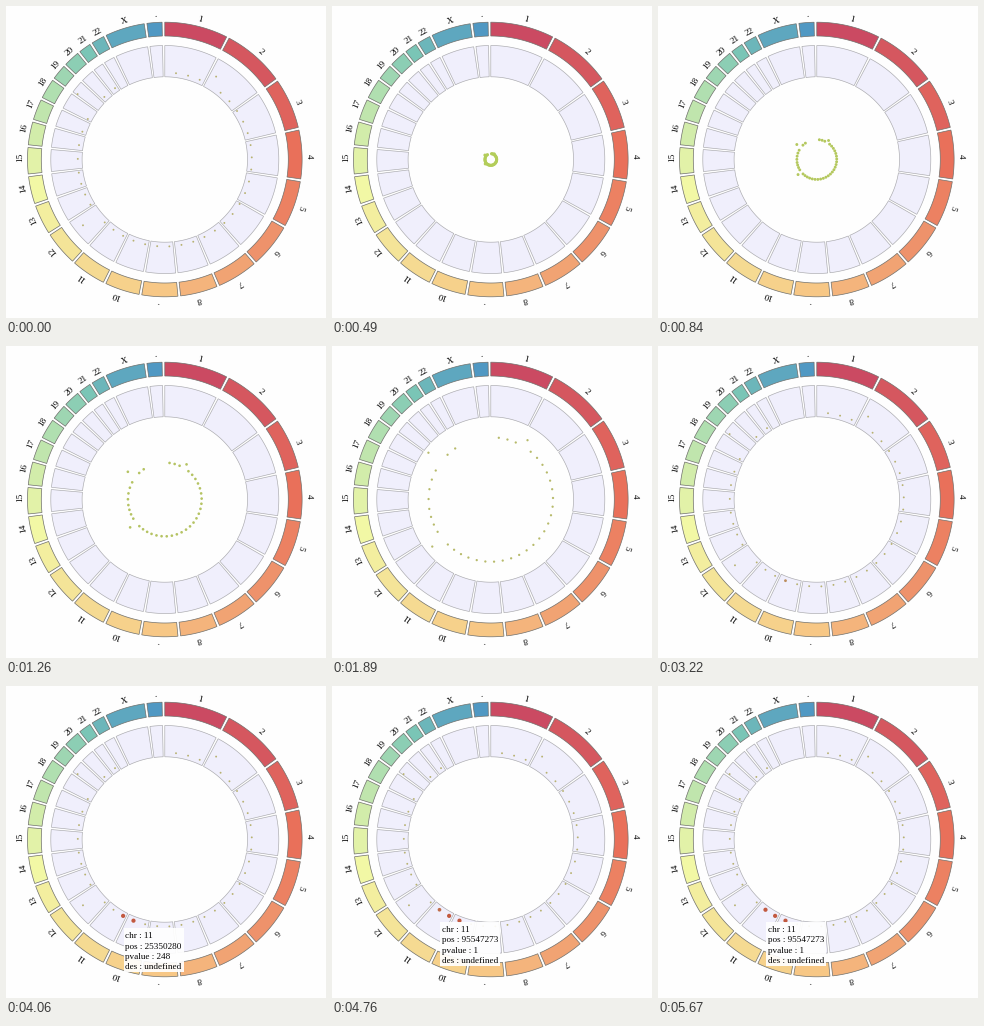
A matplotlib script that plays this animation: 320 px wide and 312 px high, repeating every 5810 ms.

```python
import numpy as np
import matplotlib.pyplot as plt
from matplotlib.animation import FuncAnimation
from matplotlib.colors import LinearSegmentedColormap, to_rgb
from matplotlib.patches import Polygon, Rectangle

W, H, DPI = 320, 312, 100
STEP, FRAMES = 70, 83
LOOP = STEP * FRAMES
CX, CY = 158.8, 153.5
PT = 72 / DPI  # points per pixel
GAP = 0.02
SERIF = "Liberation Serif"

# human chromosome lengths in Mb, 1 to 22, X, Y
LENGTHS = [249, 243, 198, 191, 181, 171, 159, 146, 141, 136, 135, 134,
           115, 107, 103, 90, 81, 78, 59, 63, 48, 51, 155, 59]
NAMES = [str(n) for n in range(1, 23)] + ["X", "."]
NAMES[8] = "."
SPECTRUM = LinearSegmentedColormap.from_list("spectrum", [
    (0, "#cb4a62"), (0.13, "#e9705a"), (0.35, "#f7c785"), (0.565, "#f2f8a5"),
    (0.74, "#b0dfb0"), (0.87, "#7ac5b6"), (1, "#5098c3")])

# points sit almost evenly around the ring, three of them further out
COUNT = 40
ANGLES = np.radians(np.interp(np.arange(COUNT), [0, 10, 24, 32, 39],
                              [7.4, 88.6, 201.1, 261.3, 325.1]))
RADII = np.full(COUNT, 87.0)
RADII[[3, 28, 37]] = 97.5, 105, 109

FLY_START, FLY_TIME = 345, 2160
DOT_NEAR, DOT_FAR, RED = (np.array(to_rgb(c)) for c in
                          ("#b3cf58", "#b8b272", "#c2593f"))

# point, start and length of its reddening, tooltip values
HOVERS = [(24, 3150, 280, ("10", "95442531", "36")),
          (25, 3780, 280, ("11", "25350280", "248")),
          (26, 4340, 560, ("11", "95547273", "1"))]
TIP_DELAY = 140


def polar(angle, radius):
    return CX + radius * np.sin(angle), CY - radius * np.cos(angle)


def sector(ax, start, end, inner, outer, **style):
    a = np.linspace(start, end, 40)
    xs, ys = polar(np.r_[a, a[::-1]], np.repeat([outer, inner], 40))
    ax.add_patch(Polygon(np.c_[xs, ys], joinstyle="miter", **style))


def draw_rings(ax):
    scale = (2 * np.pi - GAP * len(LENGTHS)) / sum(LENGTHS)
    start = 0
    for i, (name, length) in enumerate(zip(NAMES, LENGTHS)):
        end = start + length * scale
        sector(ax, start, end, 123.5, 137.3, fc=SPECTRUM(i / 23),
               ec="#70706c", lw=0.7 * PT)
        sector(ax, start, end, 82.7, 114, fc="#f0effc",
               ec="#aaaaae", lw=0.65 * PT)
        mid = (start + end) / 2 + 0.0125 * len(name)
        x, y = polar(mid, 142.4)
        ax.text(x, y, name, rotation=-np.degrees(mid), size=9.2 * PT,
                family=SERIF, color="black", ha="center", va="baseline",
                rotation_mode="anchor")
        start = end + GAP


fig = plt.figure(figsize=(W / DPI, H / DPI), dpi=DPI, facecolor="#fefefe")
ax = fig.add_axes([0, 0, 1, 1])
ax.set_xlim(0, W)
ax.set_ylim(H, 0)
ax.axis("off")
draw_rings(ax)

dots = ax.scatter(*polar(ANGLES, RADII), lw=0, zorder=3)
box = ax.add_patch(Rectangle((0, 0), 60, 44, fc="white", alpha=0.92,
                             lw=0, zorder=4))
lines = [ax.text(0, 0, "", size=9.2 * PT, family=SERIF, color="black",
                 va="baseline", zorder=5) for _ in range(4)]


def show_tooltip(x, y, values):
    box.set_xy((x + 0.5, y + 12.5))
    for k, (key, value) in enumerate(zip(("chr", "pos", "pvalue", "des"),
                                         (*values, "undefined"))):
        lines[k].set_position((x + 2.2, y + 22.5 + 10.2 * k))
        lines[k].set_text(f"{key} : {value}")


def update(frame):
    t = frame * STEP
    spread = 1 if frame == 0 else np.clip((t - FLY_START) / FLY_TIME, 0, 1)
    xs, ys = polar(ANGLES, RADII * spread)
    sizes = np.full(COUNT, 1.6 - 0.65 * spread)
    colors = np.tile(DOT_NEAR + (DOT_FAR - DOT_NEAR) * spread, (COUNT, 1))

    visible = False
    ends = [hover[1] for hover in HOVERS[1:]] + [LOOP]
    for (i, begin, length, values), end in zip(HOVERS, ends):
        k = np.clip((t - begin + STEP) / (length + STEP), 0, 1)
        sizes[i] += (2.1 - sizes[i]) * k
        colors[i] += (RED - colors[i]) * k
        if begin + TIP_DELAY <= t < end:
            show_tooltip(xs[i], ys[i], values)
            visible = True
    for item in [box, *lines]:
        item.set_visible(visible)

    dots.set_offsets(np.c_[xs, ys])
    dots.set_sizes((2 * sizes * PT) ** 2)
    dots.set_facecolor(colors)
    return [dots, box, *lines]


anim = FuncAnimation(fig, update, frames=FRAMES, interval=STEP,
                     repeat=True, repeat_delay=0)
plt.show()
```
